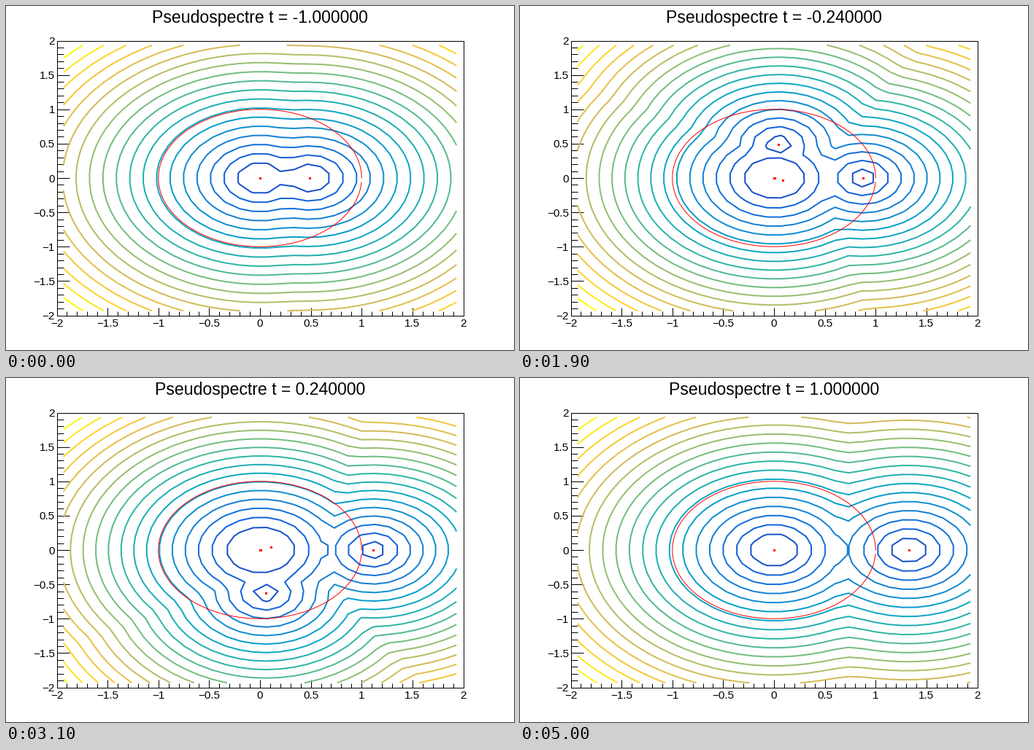
A matplotlib script that plays this animation: 696 px wide and 472 px high, repeating every 5100 ms.

```python
import numpy as np
import matplotlib.pyplot as plt
from matplotlib.animation import FuncAnimation
from matplotlib.colors import LinearSegmentedColormap
from matplotlib.ticker import MultipleLocator, NullFormatter

W, H, DPI = 696, 472, 100
LEFT, RIGHT, TOP, BOTTOM = 69.5, 626.5, 47.5, 424.5
STEPS, BINS, LEVELS = 51, 30, 20
PX = 72 / DPI

plt.rcParams["font.family"] = "Liberation Sans"

BIRD = LinearSegmentedColormap.from_list("bird", list(zip(
    [0.2082, 0.0592, 0.0780, 0.0232, 0.1802, 0.5301, 0.8186, 0.9956, 0.9764],
    [0.1664, 0.3599, 0.5041, 0.6419, 0.7178, 0.7492, 0.7328, 0.7862, 0.9832],
    [0.5293, 0.8684, 0.8385, 0.7914, 0.6425, 0.4662, 0.3499, 0.1968, 0.0539])), N=255)
LINE_COLORS = [BIRD(int((i + 0.99) * 255 / LEVELS)) for i in range(1, LEVELS)]

centers = -2 + (np.arange(BINS) + 0.5) * 4 / BINS
grid_x, grid_y = np.meshgrid(centers, centers)
grid_z = (grid_x + 1j * grid_y).ravel()


def overlap(m, n, t):
    """<phi_m | L_t phi_n>: L_t u(x) = u(x exp(-t)), phi_n a packet at (n, 2 pi n)."""
    s = np.exp(-t)
    b = m + s * n + 2j * np.pi * (s * n - m)
    q = 1 + s * s
    return np.sqrt(2 / q) * np.exp(b * b / (2 * q) - (m * m + n * n) / 2)


def dilation_matrix(t):
    """Even sector of the dilation operator, cut where entries become negligible."""
    size = 1 if t == 0 else min(40, int(np.ceil(3 / abs(np.sinh(t)))))
    k = np.arange(size + 1.0)
    m, n = k[:, None], k[None, :]
    w = np.where(k == 0, 1, np.sqrt(2))
    return np.outer(w, w) / 2 * (overlap(m, n, t) + overlap(m, -n, t))


def smallest_singular(a):
    shifted = a[None] - grid_z[:, None, None] * np.eye(len(a))
    return np.linalg.svd(shifted, compute_uv=False)[:, -1].reshape(BINS, BINS)


fig = plt.figure(figsize=(W / DPI, H / DPI), dpi=DPI, facecolor="white")
ax = fig.add_axes([LEFT / W, 1 - BOTTOM / H, (RIGHT - LEFT) / W, (BOTTOM - TOP) / H])
ax.set(xlim=(-2, 2), ylim=(-2, 2))
ax.patch.set_visible(False)
for spine in ax.spines.values():
    spine.set_linewidth(PX)

for axis, length in ((ax.xaxis, 11.5), (ax.yaxis, 17)):
    axis.set_major_locator(MultipleLocator(0.5))
    axis.set_minor_locator(MultipleLocator(0.1))
    axis.set_major_formatter(NullFormatter())
    axis.set_tick_params(which="major", direction="in", length=length * PX, width=PX)
    axis.set_tick_params(which="minor", direction="in", length=length / 2 * PX, width=PX)


def put(x, y, text, size, ha="center"):
    return fig.text(x / W, 1 - y / H, text, fontsize=size * PX, ha=ha, va="baseline")


for v in np.arange(-2, 2.1, 0.5):
    label = f"{v:g}".replace("-", "\u2212")
    put(348 + v * (RIGHT - LEFT) / 4, 440.5, label, 15.3)
    put(67, 236 - v * (BOTTOM - TOP) / 4 + 5.5, label, 15.3, "right")

title = put(348, 22.5, "", 23)

theta = np.linspace(0, 2 * np.pi, 100, endpoint=False)
ax.plot(np.cos(theta), np.sin(theta), color="red", lw=PX, zorder=4)
dots, = ax.plot([], [], "s", color="red", ms=3 * PX, mew=0, zorder=5)
drawn = []


def update(i):
    t = (i - 25) / 25
    a = dilation_matrix(t)
    sigma = smallest_singular(a)
    while drawn:
        drawn.pop().remove()
    levels = np.linspace(sigma.min(), sigma.max(), LEVELS + 1)[1:-1]
    drawn.append(ax.contour(centers, centers, sigma, levels=levels,
                            colors=LINE_COLORS, linewidths=2 * PX, zorder=2.6))
    eig = np.linalg.eigvals(a)
    if t:
        eig = np.append(eig, 0)
    dots.set_data(eig.real, eig.imag)
    title.set_text(f"Pseudospectre t = {t:f}")
    return [dots, title]


anim = FuncAnimation(fig, update, frames=STEPS, interval=100,
                     init_func=lambda: [], repeat=True, repeat_delay=0, blit=False)
plt.show()
```
